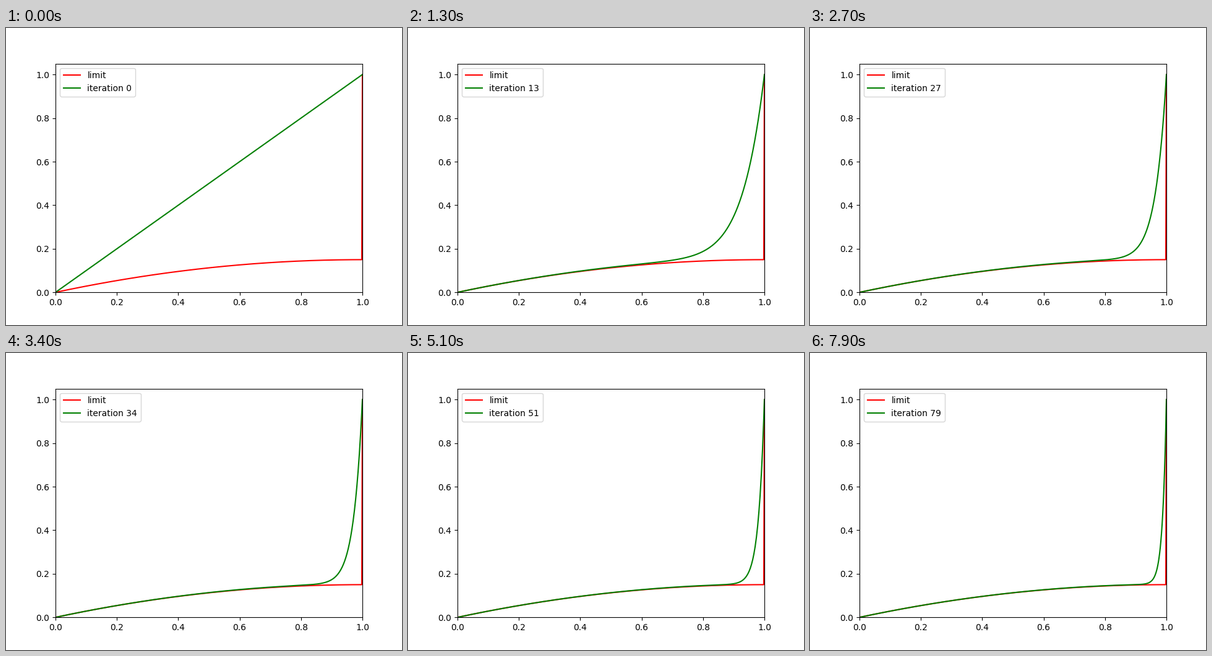
Animation, 640 px wide and 480 px high, one loop 8000 ms. Source, as a matplotlib script:

```python
import numpy as np
import matplotlib.pyplot as plt
from matplotlib.animation import FuncAnimation

FRAMES = 80
INTERVAL = 100

x = np.linspace(0, 1, 500)


def limit(x):
    return np.where(x < 1, 0.3 * x - 0.15 * x**2, 1.0)


def iterate(x, n):
    """Straight line for n = 0, tending to limit(x) as n grows."""
    m = n + 1
    bend = 0.15 * (1 - 1 / m)
    return 0.3 * x - bend * x**2 + (0.7 + bend) * x**m


fig, ax = plt.subplots(figsize=(6.4, 4.8), dpi=100)
ax.set_xlim(0, 1)
ax.set_ylim(0, 1.05)
ax.plot(x, limit(x), color="red", label="limit")
curve, = ax.plot(x, x, color="green")


def update(n):
    curve.set_ydata(iterate(x, n))
    curve.set_label(f"iteration {n}")
    ax.legend(loc="upper left")
    return curve,


anim = FuncAnimation(fig, update, frames=FRAMES, interval=INTERVAL,
                     repeat=True, repeat_delay=0, blit=False)
plt.show()
```
